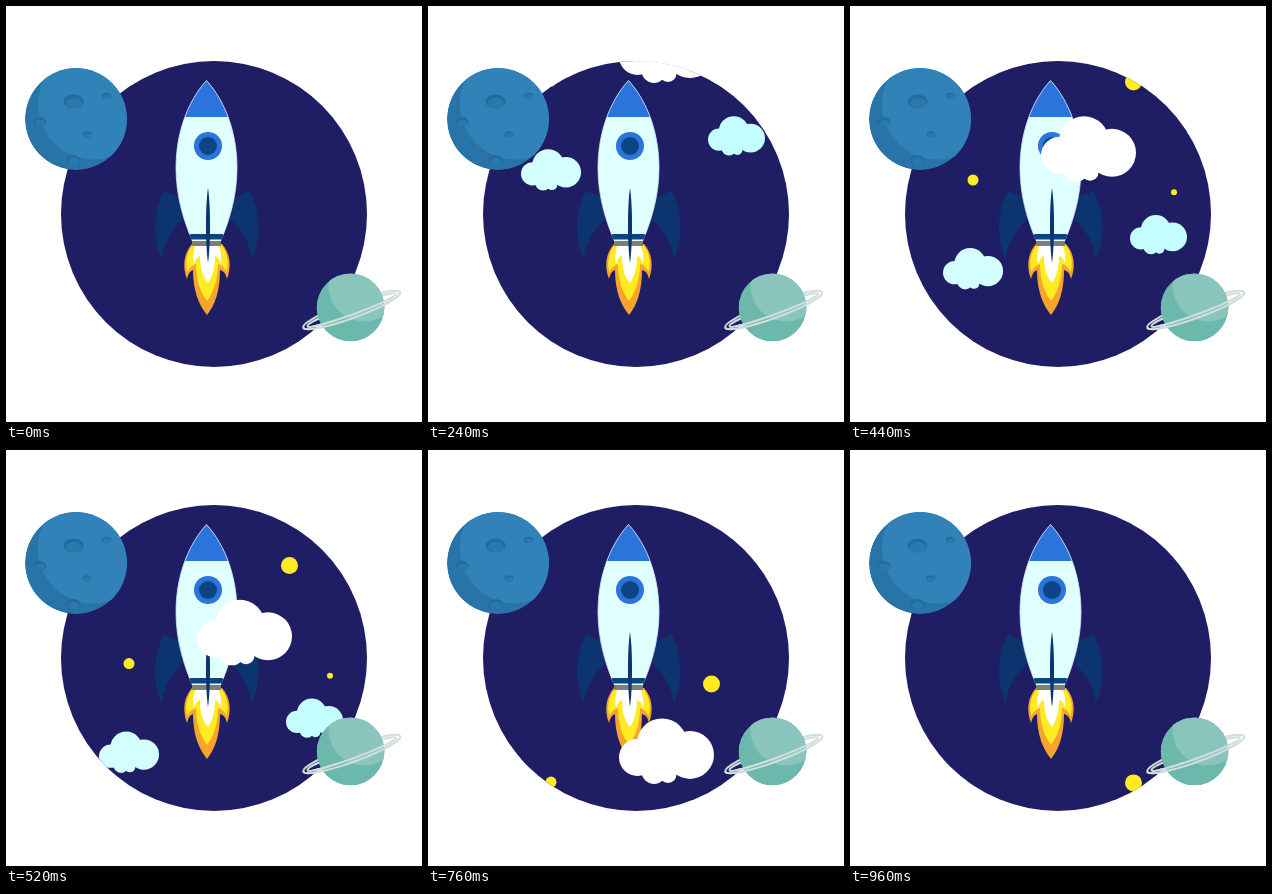
These frames come from a looping animation (416 by 416 pixels, 1000 ms). An HTML page:

```html
<!DOCTYPE html>
<html lang="en">
<head>
<meta charset="utf-8">
<title>Rocket</title>
<style>
  html, body { margin: 0; width: 100%; height: 100%; overflow: hidden; background: #fff; }
  svg { display: block; width: 100vw; height: 100vh; }
</style>
</head>
<body>
<svg viewBox="0 0 416 416">
  <defs>
    <clipPath id="sky"><circle cx="208" cy="208" r="153"/></clipPath>
    <clipPath id="moonEdge"><circle cx="70" cy="113" r="51"/></clipPath>
    <clipPath id="planetEdge"><circle cx="344.5" cy="301.5" r="34"/></clipPath>
    <clipPath id="hull"><path d="M200.5 74.5C181 96 170 128 170 162C170 190 178 215 186 235H215C223 215 231 190 231 162C231 128 220 96 200.5 74.5Z"/></clipPath>
    <g id="cloud">
      <circle cx="43" cy="25" r="25"/>
      <circle cx="18.5" cy="39" r="18.5"/>
      <circle cx="71" cy="36.5" r="24"/>
      <circle cx="35" cy="53" r="12.5"/>
      <circle cx="49" cy="56" r="8.5"/>
      <path d="M20 38H70V56H22Z"/>
    </g>
    <path id="fin" d="M158 184C147 206 146 232 156 254C157 237 166 223 177 214L172 190Q164 189 158 184Z"/>
    <g id="crater">
      <ellipse rx="10" ry="7" fill="#226a9f"/>
      <ellipse cx=".5" cy="1.6" rx="8" ry="5" fill="#2b78ae"/>
    </g>
  </defs>

  <circle cx="208" cy="208" r="153" fill="#1f1d63"/>

  <g id="rocket">
    <g fill="#0c3570">
      <use href="#fin"/>
      <use href="#fin" transform="translate(401.5) scale(-1 1)"/>
    </g>
    <path fill="#f7a32f" d="M186 238C178 247 176 260 181 273C182 268 184 265 187 264C187 285 193 299 201 309C209 299 214 285 214 264C218 265 220 268 221 273C226 260 224 247 216 238Z"/>
    <path fill="#ffeb22" d="M187 238C180 248 179 257 181.5 266C184 261 187 259 190 258C190 275 195 287 201 295C207 287 212 275 212 258C216 259 219 262 220.5 266C223 257 222 248 215 238Z"/>
    <path fill="#fff" d="M190 238C187 246 187 251 188 258C190 252 192 250 194 250C194 263 197 271 202 277C206 271 209 263 209 250C212 251 214 253 215 258C216 251 215 245 212 238Z"/>
    <path fill="#7d7d7d" d="M186 233H215V240H186Z"/>
    <g clip-path="url(#hull)">
      <path fill="#e0ffff" d="M165 70H236V235H165Z"/>
      <path fill="#2b74dc" d="M165 70H236V111H165Z"/>
      <path fill="#0c4480" d="M165 228H236V233.500H165Z"/>
    </g>
    <path fill="none" stroke="#d5e6fa" stroke-width=".8" d="M184 229C177 212 170 189 170 162C170 128 181 96 200.500 74.500C220 96 231 128 231 162C231 189 224 212 217 229"/>
    <circle cx="202" cy="140" r="14" fill="#2b74dc"/>
    <circle cx="202" cy="140" r="9" fill="#0d4484"/>
    <path fill="#0a3570" d="M202 182C204.700 200 204.700 238 202 257C199.300 238 199.300 200 202 182Z"/>
  </g>

  <g clip-path="url(#sky)">
    <g id="drift">
      <g fill="#ffeb22">
        <circle cx="123" cy="174" r="5.500"/>
        <circle cx="283.500" cy="76" r="8.500"/>
        <circle cx="324" cy="186.200" r="3"/>
      </g>
      <use href="#cloud" fill="#d4ffff" transform="translate(93 242) scale(.632)"/>
      <use href="#cloud" fill="#c5feff" transform="translate(280 209) scale(.6)"/>
      <use href="#cloud" fill="#fff" transform="translate(191 110.300)"/>
    </g>
  </g>

  <g id="moon" clip-path="url(#moonEdge)">
    <circle cx="70" cy="113" r="51" fill="#2874a9"/>
    <circle cx="87.500" cy="98" r="55.500" fill="#3282ba"/>
    <use href="#crater" transform="translate(67.500 95.500)"/>
    <use href="#crater" transform="translate(100.500 90) scale(.48)"/>
    <use href="#crater" transform="translate(34 116) scale(.68)"/>
    <use href="#crater" transform="translate(81 128.500) scale(.45)"/>
    <use href="#crater" transform="translate(67.500 154.500) scale(.7 .8)"/>
  </g>

  <g id="planet">
    <g fill="none" stroke="#d0dfdc" stroke-width="2" transform="translate(345.700 304) rotate(-20)">
      <ellipse rx="51.500" ry="8"/>
      <ellipse rx="47" ry="4.500"/>
    </g>
    <g clip-path="url(#planetEdge)">
      <circle cx="344.500" cy="301.500" r="34" fill="#6cb8ac"/>
      <circle cx="358" cy="280" r="35.500" fill="#8ac5bd"/>
    </g>
    <g fill="none" stroke="#d0dfdc" stroke-width="2" transform="translate(345.700 304) rotate(-20)">
      <path d="M-51.500 0A51.500 8 0 0 0 51.500 0"/>
      <path d="M-47 0A47 4.500 0 0 0 47 0"/>
    </g>
  </g>
</svg>
<script>
  const LOOP = 1000, STEP = 40;
  const SPEED = 0.494;   // px per ms
  const REST = 440;      // time at which the drifting layer has no offset
  const drift = document.getElementById('drift');

  function draw(ms) {
    const t = Math.floor((ms % LOOP) / STEP) * STEP;
    drift.setAttribute('transform', `translate(0 ${(SPEED * (t - REST)).toFixed(2)})`);
  }

  const start = performance.now();
  function tick() {
    draw(performance.now() - start);
    requestAnimationFrame(tick);
  }
  tick();
</script>
</body>
</html>
```
